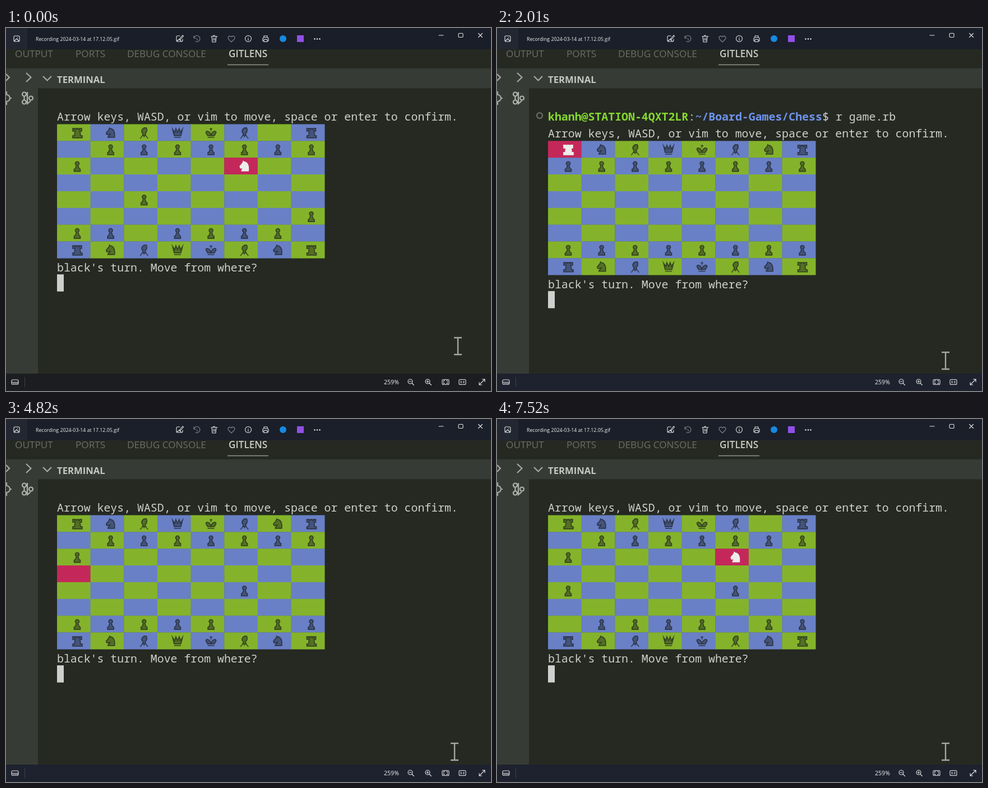
Recreate the animation shown at these times as an HTML page with a canvas. Size 865 by 647 pixels, loop 8000 ms.

```html
<!DOCTYPE html>
<html lang="en">
<head>
<meta charset="utf-8">
<title>Terminal chess</title>
<style>
  html, body { margin: 0; width: 100%; height: 100%; overflow: hidden; background: #252922; }
  canvas, svg { position: absolute; left: 0; top: 0; }
  canvas { filter: blur(.7px); }
  svg { font-family: "Open Sans", sans-serif; }
  .icon { fill: none; stroke: #e6e6e8; stroke-width: 1.1; stroke-linecap: round; stroke-linejoin: round; }
  .dim { stroke: #85878d; }
</style>
</head>
<body>
<canvas id="screen" width="865" height="647"></canvas>
<svg width="865" height="647">
  <rect id="titleBar" width="865" height="38"/>
  <rect width="38" height="38" fill="#fff" fill-opacity=".035"/>
  <rect id="statusBar" y="616" width="865" height="31"/>
  <text x="53" y="23" font-size="8.8" fill="#f0f0f2">Recording 2024-03-14 at 17.12.05.gif</text>
  <text x="674" y="635" font-size="10.6" fill="#f0f0f2">259%</text>
  <path d="M33.5 622v18" stroke="#3d404a"/>
  <g class="icon">
    <!-- title bar -->
    <path d="M16 14h6q2 0 2 2v6q0 2-2 2h-6q-2 0-2-2v-6q0-2 2-2zM15 23l4-4 4 4M20.5 16.6v.4"/>
    <path d="M310 14h-4q-2 0-2 2v6q0 2 2 2h7q2 0 2-2v-2M305 23l4-3 3 3M310 19l5-6 1.5 1.5-5 5.500-2 .5z"/>
    <path class="dim" d="M335 14v4h4M335 18a5.500 5.500 0 1 1 3 6M341 19v3"/>
    <path d="M366 15h11M369 15q2-4 4 0M367 15l1 10h6l1-10M370 18v4M372.500 18v4"/>
    <path class="dim" d="M402 25l-5-5c-3-4 2-8 5-4 3-4 8 0 5 4z"/>
    <circle cx="432" cy="19" r="5.500"/><path d="M432 18.500v3.500M432 16v.2"/>
    <path d="M460 17v-3h6v3M460 23h-2v-4q0-2 2-2h6q2 0 2 2v4h-2M460 20.500h6v4h-6z"/>
    <path d="M772 13h8M808.500 9.500h5q1.500 0 1.500 1.500v4q0 1.500-1.500 1.500h-5q-1.500 0-1.500-1.500v-4q0-1.500 1.500-1.500zM842.500 9.500l7 7M849.500 9.500l-7 7"/>
    <!-- status bar -->
    <path d="M12 627h8q2 0 2 2v4q0 2-2 2h-8q-2 0-2-2v-4q0-2 2-2zM10 631.500h12M13 633.500h1M16 633.500h1M19 633.500h1"/>
    <circle cx="721" cy="630" r="4"/><path d="M724 633l3.500 3.500M719 630h4"/>
    <circle cx="752" cy="630" r="4"/><path d="M755 633l3.500 3.500M750 630h4M752 628v4"/>
    <path d="M780 626.500h8q2 0 2 2v5q0 2-2 2h-8q-2 0-2-2v-5q0-2 2-2zM780.500 630v-1.500h2M787.500 630v-1.500h-2M780.500 632v1.500h2M787.500 632v1.500h-2"/>
    <path d="M810 626.500h8q2 0 2 2v5q0 2-2 2h-8q-2 0-2-2v-5q0-2 2-2zM811.500 629v4M816.500 629v4M814 630v.1M814 632.500v.1"/>
    <path d="M844 636l10-10M849.500 626h4.500v4.500M844 631.500v4.500h4.500"/>
  </g>
  <circle cx="494" cy="19" r="6" fill="#1689e0"/>
  <rect x="519" y="13" width="12" height="12" fill="#9150e6"/>
  <g fill="#f0f0f2"><circle cx="550.500" cy="19.500" r="1.2"/><circle cx="555" cy="19.500" r="1.2"/><circle cx="559.500" cy="19.500" r="1.2"/></g>
</svg>
<script>
const ctx = document.getElementById('screen').getContext('2d');
const LOOP = 8000, LEFT = 91, TOP = 141.6, CHAR = 11.93, LINE = 29.85, CELL = 5 * CHAR;
const RED = '#c4285b', GREY = '#666765', GREEN = '#84b32b', BLUE = '#6980c6', LIGHT = '#cfd0cd';

// Piece shapes around the centre of their square
const PIECES = {
  r: 'M-8-8h4v2h2v-2h4v2h2v-2h4v5h-3l1 8h3v4h-17v-4h3l1-8h-4z',
  n: 'M-5 8h12c1-9-1-15-8-16l-1-1-1 3-5 6 1 3h4l2-1c0 2-4 3-4 6z',
  b: 'M0-9c-6 4-5 8-2 10l-1 4h6l-1-4c3-2 4-6 2-10zM-3 5l-4 5M3 5l4 5M0 5v3',
  q: 'M-9-7l3 12h12l3-12-4 6-2-7-3 7-3-7-2 7zM-6 8h12',
  k: 'M0-9v6M-2.500-7h5M0 4c-2-8-10-9-9-4l3 5h12l3-5c1-5-7-4-9 4zM-6 8h12',
  p: 'M-1.500-2a3.500 3.500 0 1 1 3 0l2 6 2 1v4h-11v-4l2-1z',
};
for (const kind in PIECES) PIECES[kind] = new Path2D(PIECES[kind]);

const back = 'rnbqkbnr', pawns = 'pppppppp', none = '........';
const lastGame = ['rnbqkb.r', '.ppppppp', 'p....n..', none, '..p.....', '.......p', 'pp.pppp.', back];
const start = [back, pawns, none, none, none, none, pawns, back];
const opened = [back, '.ppppppp', 'p.......', none, '.....p..', none, 'ppppp.pp', back];
const developed = ['rnbqkb.r', '.ppppppp', 'p....n..', none, 'p....p..', none, '.pppp.pp', back];

function text(str, x, y, color, font) {
  ctx.font = font;
  ctx.fillStyle = color;
  ctx.fillText(str, x, y);
}

function rect(x, y, w, h, color) {
  ctx.fillStyle = color;
  ctx.fillRect(x, y, w, h);
}

function stroke(path, color, width) {
  ctx.strokeStyle = color;
  ctx.lineWidth = width;
  ctx.stroke(new Path2D(path));
}

function type(str, line, col = 0, color = LIGHT, weight = 500) {
  text(str, LEFT + col * CHAR, TOP + line * LINE + 23.4, color, `${weight} 19.88px "Noto Sans Mono", monospace`);
}

const caret = (line, col = 0) => rect(LEFT + col * CHAR, TOP + line * LINE - 1, 12, 30.5, LIGHT);

function prompt(line, command, showCaret = true) {
  const y = TOP + line * LINE + 14.5;
  stroke(`M71 ${y}a5 5 0 1 1 10 0a5 5 0 1 1-10 0`, '#686b66', 2.4);
  type('khanh@STATION-4QXT2LR', line, 0, '#86d82f', 700);
  type(':', line, 21);
  type('~/Board-Games/Chess', line, 22, '#6f93ee', 700);
  type('$ ' + command, line, 41);
  if (showCaret) caret(line, 43 + command.length);
}

function piece(kind, x, y, active) {
  ctx.save();
  ctx.translate(x, y);
  ctx.fillStyle = active ? '#ececea' : 'rgba(25,29,28,.45)';
  ctx.strokeStyle = active ? '#ececea' : 'rgba(25,29,28,.65)';
  ctx.lineWidth = 1.7;
  ctx.fill(PIECES[kind]);
  ctx.stroke(PIECES[kind]);
  ctx.restore();
}

function game(board, row, col, { moving = false, line = 0, showCaret = true } = {}) {
  type('Arrow keys, WASD, or vim to move, space or enter to confirm.', line);
  const top = TOP + (line + 1) * LINE;
  board.forEach((pieces, r) => [...pieces].forEach((kind, c) => {
    const active = r === row && c === col;
    const x = LEFT + c * CELL, y = top + r * LINE;
    const square = (r + c) % 2 ? BLUE : GREEN;
    rect(x, y, CELL + .3, LINE + .3, active ? (moving ? GREY : RED) : square);
    if (PIECES[kind]) piece(kind, x + 36, y + 15.5, active);
  }));
  type(`black's turn. Move ${moving ? 'to' : 'from'} where?`, line + 9);
  if (showCaret) caret(line + 10);
}

const quit = command => {
  game(lastGame, 2, 5, { showCaret: false });
  prompt(10, command);
};
const moving = { moving: true };

const scenes = [
  [0, () => game(lastGame, 2, 5)],
  [980, () => quit('')],
  [1380, () => quit('c')],
  [1470, () => prompt(0, '')],
  [1620, () => prompt(0, 'r')],
  [1790, () => prompt(0, 'r game.rb ')],
  [1860, () => { prompt(0, 'r game.rb', false); caret(1); }],
  [2010, () => { prompt(0, 'r game.rb', false); game(start, 0, 0, { line: 1 }); }],
  [2590, () => game(start, 1, 0)],
  [3920, () => game(start, 1, 0, moving)],
  [4160, () => game(start, 2, 0, moving)],
  [4410, () => game(opened, 2, 0)],
  [4820, () => game(opened, 3, 0)],
  [5060, () => game(opened, 3, 1)],
  [5640, () => game(opened, 3, 3)],
  [5720, () => game(opened, 3, 5)],
  [5800, () => game(opened, 2, 5)],
  [5970, () => game(opened, 1, 5)],
  [6210, () => game(opened, 1, 6)],
  [6610, () => game(opened, 0, 6, moving)],
  [6950, () => game(opened, 1, 6, moving)],
  [7100, () => game(opened, 2, 6, moving)],
  [7350, () => game(opened, 2, 5, moving)],
  [7520, () => game(developed, 2, 5)],
];

// time, pointer x, pointer y, title bar colour, status bar colour
const pointerSteps = [
  [0, 806, 567, '#191e28', '#1c1d20'],
  [80, 805, 575, '#191e28', '#1d1e25'],
  [160, 802, 587, '#1a1e29', '#1d202a'],
  [240, 800, 593, '#1a1f29', '#1e212e'],
];

const current = (steps, t) => steps.findLast(step => step[0] <= t);

function editor() {
  rect(0, 0, 865, 647, '#252922');
  rect(0, 72, 865, 35.500, '#373b35');
  rect(0, 72, 57, 545, '#373b35');
  const ui = '17.2px "Open Sans", sans-serif';
  text('OUTPUT', 16, 52, '#6c6f68', ui);
  text('PORTS', 124, 52, '#6c6f68', ui);
  text('DEBUG CONSOLE', 216, 52, '#6c6f68', ui);
  text('GITLENS', 397, 52, '#c9cbc5', '600 ' + ui);
  text('TERMINAL', 91, 97.5, '#c6c8c2', '700 16.7px "Open Sans", sans-serif');
  stroke('M395 65.500h73', '#92958d', 1.6);
  stroke('M0 82l6 6-6 6M36 80l8.500 8-8.500 8M66 86l7.500 7.500 7.500-7.500', '#a6a9a2', 2.2);
  stroke('M1 113v6a6 6 0 0 1 0 12v6M7 125h3', '#a6a9a2', 2.2);
  stroke('M29 118a3.500 3.500 0 1 1 7 0a3.500 3.500 0 1 1-7 0M29 132a3.500 3.500 0 1 1 7 0a3.500 3.500 0 1 1-7 0' +
    'M41 125a3.500 3.500 0 1 1 7 0a3.500 3.500 0 1 1-7 0M32.500 121v8M38 114v21l6-5', '#b0b3ac', 2.2);
}

function frame() {
  const t = performance.now() % LOOP;
  const [, x, y, title, status] = current(pointerSteps, t);
  editor();
  current(scenes, t)[1]();
  stroke(`M${x - 7} ${y - 15}h14M${x} ${y - 15}v30M${x - 7} ${y + 15}h14`, '#a5a8a2', 2.4);
  document.getElementById('titleBar').setAttribute('fill', title);
  document.getElementById('statusBar').setAttribute('fill', status);
  requestAnimationFrame(frame);
}
frame();
</script>
</body>
</html>
```
